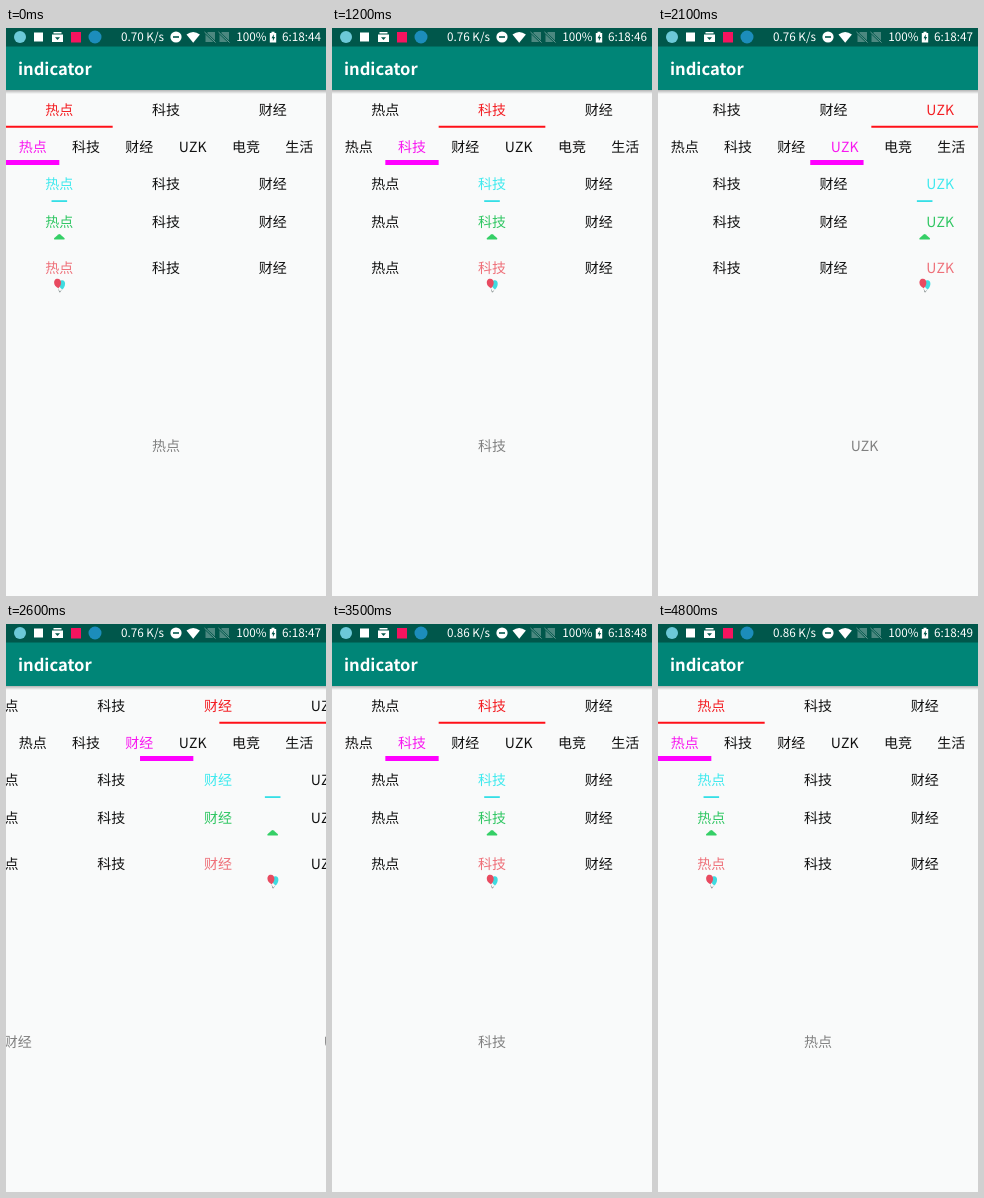
Write an HTML page that moves like this. It is 320 px wide and 568 px high and loops after 5000 ms.

```html
<!DOCTYPE html>
<html lang="zh-CN">
<head>
<meta charset="utf-8">
<title>indicator</title>
<style>
html, body { margin: 0; width: 100%; height: 100%; overflow: hidden; background: #f9fafa; }
svg { display: block; width: 320px; height: 568px; font: 14px "Noto Sans CJK SC", "Noto Sans CJK", "Noto Sans", sans-serif; text-rendering: geometricPrecision; }
.tab { text-anchor: middle; }
.status { font-size: 11.7px; fill: #fff; }
</style>
</head>
<body>
<svg id="stage" viewBox="0 0 320 568">
  <defs>
    <linearGradient id="shade" x2="0" y2="1">
      <stop stop-color="#000" stop-opacity=".28"/>
      <stop offset="1" stop-color="#000" stop-opacity="0"/>
    </linearGradient>
  </defs>
  <rect width="320" height="568" fill="#f9fafa"/>
  <rect y="62" width="320" height="4" fill="url(#shade)"/>
  <rect y="18" width="320" height="44" fill="#008577"/>
  <rect width="320" height="18.5" fill="#00574b"/>
  <text x="12" y="46.6" fill="#fff" font-size="16.6" font-weight="700">indicator</text>

  <!-- status icons -->
  <circle cx="14" cy="9" r="6" fill="#6cc9d8"/>
  <rect x="28" y="4.5" width="9" height="9" fill="#fff"/>
  <path d="M47.5 4h8v1.6h-8zM46 6.5h11v7.5h-11z" fill="#fff"/>
  <path d="M49 9.3h5l-2.5 2.8z" fill="#00574b"/>
  <rect x="65" y="4" width="10" height="10.5" fill="#f5145f"/>
  <circle cx="89" cy="9" r="6.5" fill="#1c8dbb"/>
  <circle cx="170" cy="9" r="5.6" fill="#fff"/>
  <path d="M167 9h6" stroke="#00574b" stroke-width="1.6"/>
  <path d="M180.5 6.5q6.7-5 13.4 0l-6.7 8.2z" fill="#fff"/>
  <g id="sim">
    <path d="M202 4h7v10h-9.5v-7.5z" fill="#4c8880"/>
    <path d="M198.5 4l11 10.5" stroke="#00574b" stroke-width="2.4"/>
    <path d="M198.5 4l11 10.5" stroke="#6b9e97"/>
  </g>
  <use href="#sim" x="14"/>
  <path d="M265.5 3.8h3v1.2h1.7v9.5h-6.4v-9.5h1.7z" fill="#fff"/>
  <path d="M267.8 6.2l-2.3 4h1.4v2.8l2.2-4h-1.4z" fill="#00574b"/>
  <text id="speed" class="status" x="115" y="13.2"></text>
  <text class="status" x="230.3" y="13.2">100%</text>
  <text id="clock" class="status" x="276" y="13.2"></text>
</svg>
<script>
const stage = document.getElementById('stage');
const speed = document.getElementById('speed');
const clock = document.getElementById('clock');
const names = ['热点', '科技', '财经', 'UZK', '电竞', '生活'];
const wide = 320 / 3, slim = 320 / 6;

function add(parent, tag, attrs, text) {
  const el = document.createElementNS('http://www.w3.org/2000/svg', tag);
  for (const k in attrs) el.setAttribute(k, attrs[k]);
  if (text) el.textContent = text;
  return parent.appendChild(el);
}
const label = (parent, x, y, text, fill) =>
  add(parent, 'text', { class: 'tab', x, y: y + 5, fill }, text);

// Markers are drawn around the centre of their tab.
const rows = [
  { y: 81.5, w: wide, color: '#f31d22', marks: [['M-53.33 97.7h106.67v2h-106.67z', '#ff1018']] },
  { y: 118.7, w: slim, color: '#f818f0', marks: [['M-26.67 132h53.33v5h-53.33z', '#ff00ff']] },
  { y: 156, w: wide, color: '#3fe9ee', marks: [['M-7.8 172.2h15.6v1.8h-15.6z', '#35dfe6']] },
  { y: 193.5, w: wide, color: '#2fc662', marks: [['M-5 211.4q-.8-.8 0-1.5l4-3.4q1-.8 2 0l4 3.4q.8.7 0 1.5z', '#35cf66']] },
  { y: 239.5, w: wide, color: '#ee7079', marks: [
    ['M2.2 252.3c4-.8 5 5 .8 9.2c-4.5-2.8-4.5-8-.8-9.2z', '#3fdbe0'],
    ['M-2.8 250.8c5.5-1 5.8 6.2 1.8 9.4c-5-1.8-5.5-8-1.8-9.4z', '#e84a60'],
    ['M-1.3 260l1.8 3.8l2.2-2.6l-1.8 3h-1z', '#6c7777']] }
];
for (const row of rows) {
  row.strip = add(stage, 'g', {});
  row.tabs = names.map((n, i) => label(row.strip, (i + .5) * row.w, row.y, n, '#111'));
  row.mark = add(row.strip, 'g', {});
  for (const [d, fill] of row.marks) add(row.mark, 'path', { d, fill });
}
const pages = add(stage, 'g', {});
names.forEach((n, i) => label(pages, 160 + i * 320, 418, n, '#808080'));

// Swipes: start, duration, from, to, lag of the indicators behind the page, time of selection
const swipes = [
  [719, 400, 0, 1, 17, 800],
  [1360, 300, 1, 2, 8, 1400],
  [1972, 400, 2, 3, 0, 2000],
  [2543, 400, 3, 2, 7, 2600],
  [3145, 400, 2, 1, 0, 3300],
  [3740, 250, 1, 0, 15, 3800]
];
const ticks = [100, 1100, 2100, 3200, 4100];

function position(t, lagging) {
  let p = 0;
  for (const [start, dur, from, to, lag] of swipes) {
    const u = (t - start - (lagging ? lag : 0)) / dur;
    if (u > 0) p = from + (to - from) * (1 - (1 - Math.min(u, 1)) ** 5);
  }
  return p;
}
const shift = (el, x) => el.setAttribute('transform', `translate(${x})`);

function draw(now) {
  const t = Math.floor(now % 5000 / 100) * 100;   // the screen refreshes ten times a second
  const p = position(t, true);
  let selected = 0;
  for (const s of swipes) if (t >= s[5]) selected = s[3];

  for (const { strip, mark, tabs, w, color } of rows) {
    shift(strip, w === wide ? -Math.max(0, p - 2) * w : 0);
    shift(mark, (p + .5) * w);
    tabs.forEach((tab, i) => tab.setAttribute('fill', i === selected ? color : '#111'));
  }
  shift(pages, -position(t, false) * 320);
  speed.textContent = (t < 500 ? '0.70' : t < 3500 ? '0.76' : '0.86') + ' K/s';
  clock.textContent = '6:18:' + (44 + ticks.filter(x => t >= x).length);
}
function loop() {
  draw(performance.now());
  requestAnimationFrame(loop);
}
loop();
</script>
</body>
</html>
```
